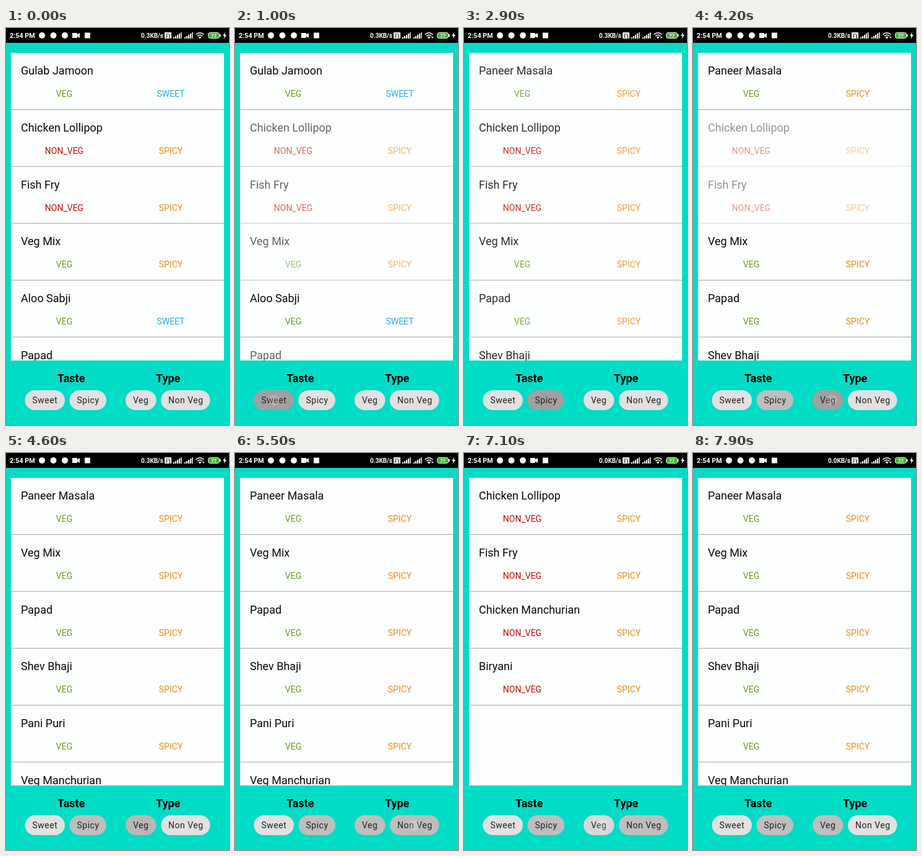
These frames come from a looping animation (360 px wide and 640 px high, 8000 ms). An HTML page:

```html
<!DOCTYPE html>
<html lang="en">
<head>
<meta charset="utf-8">
<title>Menu filter</title>
<style>
  html, body { margin: 0; width: 100%; height: 100%; overflow: hidden; background: #00dcc5; }
  svg { display: block; width: 360px; height: 640px; font-family: Roboto, sans-serif; }
  .status { font-weight: 700; fill: #fff; }
  .title { font-size: 18px; fill: #080808; }
  .tag { font-size: 14px; text-anchor: middle; }
  .VEG { fill: #6b9a1c; }
  .NON_VEG { fill: #c60b05; }
  .SWEET { fill: #2bacdb; }
  .SPICY { fill: #ee8b16; }
  .heading { font-size: 18px; font-weight: 700; fill: #000; }
  .chip { font-size: 14px; letter-spacing: .5px; fill: #202020; }
</style>
</head>
<body>
<svg viewBox="0 0 360 640">
  <defs><clipPath id="panel"><rect x="8" y="40" width="344" height="496"/></clipPath></defs>
  <rect width="360" height="640" fill="#00dcc5"/>
  <rect width="360" height="24" fill="#000"/>

  <g class="status">
    <text x="6" y="16" font-size="10.8">2:54 PM</text>
    <circle cx="58" cy="12" r="5"/>
    <circle cx="76.500" cy="12" r="5"/>
    <circle cx="95" cy="12" r="5"/>
    <path d="M107 8h8v2.500l4-2.500v8l-4-2.500v2.500h-8z"/>
    <rect x="127" y="7.500" width="9" height="9"/>
    <text id="speed" x="218" y="16" font-size="10"></text>
    <rect x="256" y="7" width="11" height="10" rx="1"/>
    <path d="M258 8.500l1.500 3 1.500-3M263 8.500v3h2M258 13h3m-1.500 0v3M263 13h2.500m-2.500 1.500h2m-2 1.500h2.500" fill="none" stroke="#000" stroke-width=".8"/>
    <path id="bars" d="M270 17v-2h2v2zM273 17v-4h2v4zM276 17v-6h2v6zM279 17v-8h2v8zM282 17V7h1.500v10z"/>
    <use href="#bars" x="18"/>
    <g fill="none" stroke="#fff" stroke-width="1.500">
      <path d="M306.500 10.500q6.500-5.500 13 0M308.800 13q4.200-3.500 8.400 0"/>
    </g>
    <path d="M310.500 14.700q2.500-2 5 0l-2.500 2.800z"/>
    <path id="traffic" d="M317 14h3.500l-1.750 3z"/>
    <rect x="326.500" y="7.500" width="18" height="9" rx="3" fill="#3fb52d" stroke="#fff"/>
    <rect x="345" y="10" width="1.500" height="4"/>
    <text x="335.500" y="15" font-size="8" text-anchor="middle">77</text>
    <path d="M354 6.500l-4 6h2.500l-1 5 4.500-6.500h-2.700z"/>
  </g>

  <rect x="8" y="40" width="344" height="496" fill="#fdfffe"/>
  <g clip-path="url(#panel)"><g id="list"></g></g>

  <text class="heading" x="83" y="571">Taste</text>
  <text class="heading" x="242" y="571">Type</text>
  <g id="chips"></g>
  <circle id="touch" cy="600" r="9" fill="#fff" fill-opacity=".18"/>
</svg>

<script>
const LOOP = 8000, STEP = 100, ROW = 275 / 3;
const FADE = 120, MOVE = 250;

const dishes = [
  ['Paneer Masala', 'VEG', 'SPICY'],
  ['Gulab Jamoon', 'VEG', 'SWEET'],
  ['Chicken Lollipop', 'NON_VEG', 'SPICY'],
  ['Fish Fry', 'NON_VEG', 'SPICY'],
  ['Veg Mix', 'VEG', 'SPICY'],
  ['Aloo Sabji', 'VEG', 'SWEET'],
  ['Papad', 'VEG', 'SPICY'],
  ['Shev Bhaji', 'VEG', 'SPICY'],
  ['Rasgulla', 'VEG', 'SWEET'],
  ['Pani Puri', 'VEG', 'SPICY'],
  ['Chicken Manchurian', 'NON_VEG', 'SPICY'],
  ['Veg Manchurian', 'VEG', 'SPICY'],
  ['Puran Poli', 'VEG', 'SWEET'],
  ['Biryani', 'NON_VEG', 'SPICY'],
].map(([name, type, taste]) => ({ name, type, taste }));

const chips = {
  Sweet: { x: 30.5, width: 64.5, spot: 63 },
  Spicy: { x: 102.5, width: 59.5, spot: 132 },
  Veg: { x: 193, width: 49.5, spot: 224 },
  'Non Veg': { x: 250, width: 79.5, spot: 290 },
};

// The unfiltered list starts scrolled down by one row.
const phases = [
  { at: -2000, selected: [], scroll: 1 },
  { at: 950, tap: 'Sweet', selected: ['Sweet'], taste: 'SWEET' },
  { at: 2690, tap: 'Spicy', selected: ['Spicy'], taste: 'SPICY' },
  { at: 4135, tap: 'Veg', selected: ['Spicy', 'Veg'], taste: 'SPICY', type: 'VEG' },
  { at: 5520, tap: 'Non Veg', selected: ['Spicy', 'Non Veg'], taste: 'SPICY', type: 'NON_VEG' },
  { at: 7200, tap: 'Veg', selected: ['Spicy', 'Veg'], taste: 'SPICY', type: 'VEG' },
];

const byId = id => document.getElementById(id);
const clamp = v => Math.min(1, Math.max(0, v));
const ease = v => (1 - Math.cos(Math.PI * clamp(v))) / 2;

function add(parent, tag, attrs, text = '') {
  const node = document.createElementNS('http://www.w3.org/2000/svg', tag);
  for (const key in attrs) node.setAttribute(key, attrs[key]);
  node.textContent = text;
  return parent.appendChild(node);
}

for (const dish of dishes) {
  const row = dish.node = add(byId('list'), 'g', {});
  add(row, 'text', { class: 'title', x: 24, y: 35.4 }, dish.name);
  add(row, 'text', { class: 'tag ' + dish.type, x: 94, y: 71.4 }, dish.type);
  add(row, 'text', { class: 'tag ' + dish.taste, x: 266, y: 71.4 }, dish.taste);
  add(row, 'rect', { x: 8, y: 91, width: 344, height: 1, fill: '#a2a4a3' });
}

for (const [name, chip] of Object.entries(chips)) {
  chip.node = add(byId('chips'), 'rect', { x: chip.x, y: 584, width: chip.width, height: 32, rx: 16 });
  add(byId('chips'), 'text', { class: 'chip', x: chip.x + 12, y: 605 }, name);
}

for (const phase of phases) {
  const shown = dishes.filter(d =>
    (!phase.taste || d.taste === phase.taste) && (!phase.type || d.type === phase.type));
  phase.rows = new Map(shown.map((d, i) => [d, i - (phase.scroll || 0)]));
}

// Removed rows fade out, kept rows move, then new rows fade in.
function drawList(now, before, after) {
  const age = now - after.at;
  const hasMoves = dishes.some(d => before.rows.has(d) && after.rows.has(d));
  const fadeOut = 1 - ease(age / FADE);
  const move = ease((age - FADE) / MOVE);
  const fadeIn = ease((age - FADE - (hasMoves ? MOVE : 0)) / FADE);
  for (const dish of dishes) {
    const from = before.rows.get(dish), to = after.rows.get(dish);
    let row = to ?? from ?? 0, opacity = 0;
    if (from !== undefined && to !== undefined) {
      row = from + (to - from) * move;
      opacity = 1;
    } else if (to !== undefined) {
      opacity = fadeIn;
    } else if (from !== undefined) {
      opacity = fadeOut;
    }
    dish.node.setAttribute('transform', `translate(0 ${40 + row * ROW})`);
    dish.node.setAttribute('opacity', opacity);
  }
}

function pressShade(age) {
  return 0.16 * clamp((age + 120) / 80) * clamp((550 - age) / 350);
}

function drawChips(now, current) {
  for (const [name, chip] of Object.entries(chips)) {
    const shade = Math.max(0, ...phases.filter(p => p.tap === name).map(p => pressShade(now - p.at)));
    const base = current.selected.includes(name) ? 190 : 225;
    const grey = Math.round(base * (1 - shade));
    chip.node.setAttribute('fill', `rgb(${grey},${grey},${grey})`);
  }
  const touched = phases.find(p => p.tap && now > p.at - 120 && now < p.at + 100);
  byId('touch').setAttribute('visibility', touched ? 'visible' : 'hidden');
  if (touched) byId('touch').setAttribute('cx', chips[touched.tap].spot);
}

function draw(now) {
  const index = phases.findLastIndex(p => p.at <= now);
  drawList(now, phases[Math.max(0, index - 1)], phases[index]);
  drawChips(now, phases[index]);
  byId('speed').textContent = now < 7000 ? '0.3KB/s' : '0.0KB/s';
  byId('traffic').setAttribute('visibility', now < 500 ? 'hidden' : 'visible');
}

const start = performance.now();
function tick() {
  const time = (performance.now() - start) % LOOP;
  draw(Math.floor(time / STEP) * STEP);
  requestAnimationFrame(tick);
}
tick();
</script>
</body>
</html>
```
